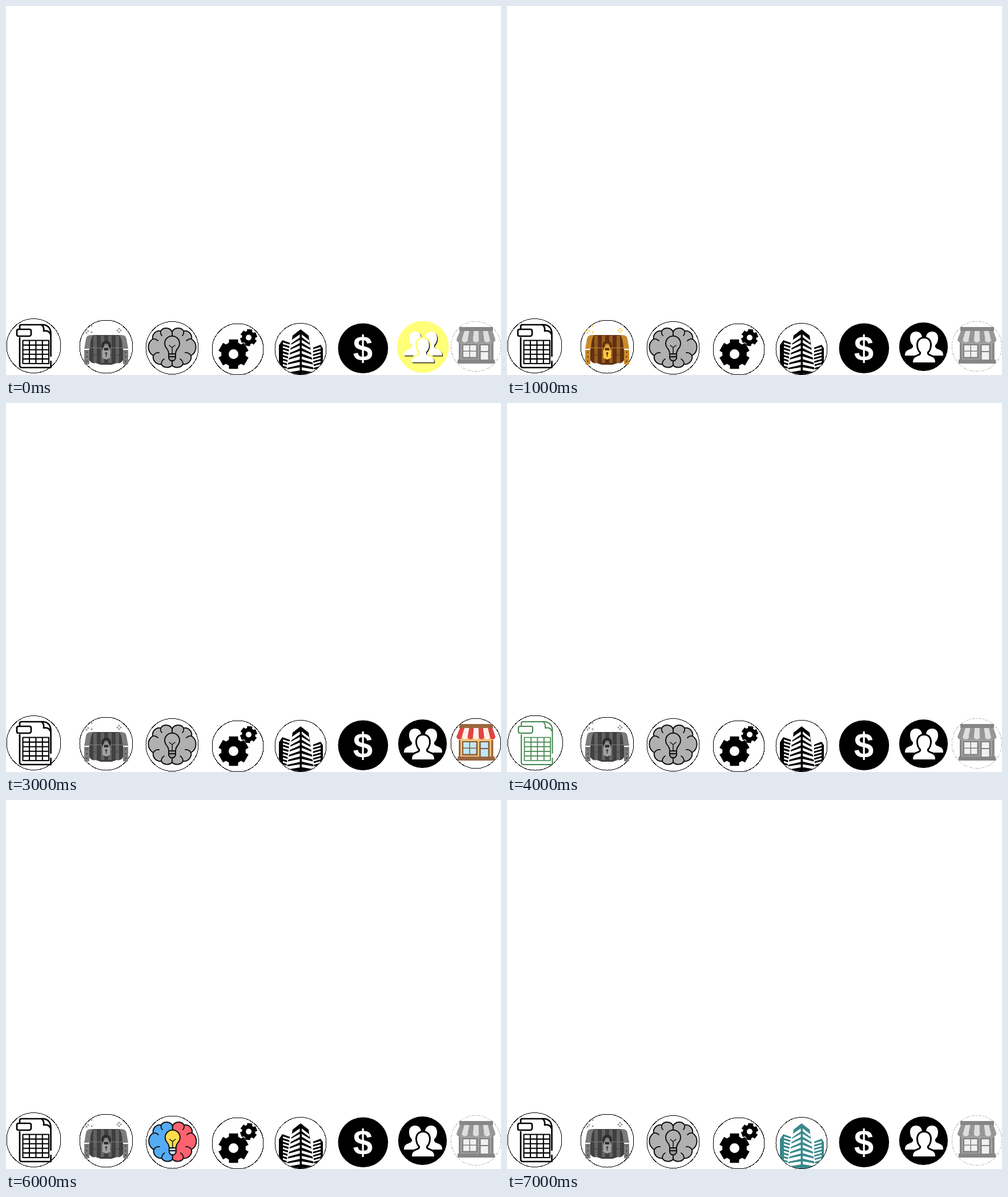
Animation, 867 px wide and 646 px high, one loop 8000 ms. Source, as an HTML page:

```html
<!DOCTYPE html>
<html lang="en">
<head>
<meta charset="utf-8">
<style>
  html, body { margin: 0; height: 100%; overflow: hidden; background: #fff; }
  svg { display: block; width: 867px; height: 646px; }
</style>
</head>
<body>
<svg id="stage" viewBox="0 0 867 646"></svg>
<script>
const STEP = 1000;
const ORDER = ['people', 'chest', 'gears', 'shop', 'sheet', 'dollar', 'brain', 'towers'];

const range = n => [...Array(n).keys()];
const repeat = (n, draw) => range(n).map(draw).join('');
const path = (d, fill = 'none', stroke = 'none', width = 1) =>
  `<path d="${d}" fill="${fill}" stroke="${stroke}" stroke-width="${width}" stroke-linecap="round" stroke-linejoin="round"/>`;
const rect = (x, y, w, h, fill) => `<rect x="${x}" y="${y}" width="${w}" height="${h}" fill="${fill}"/>`;
const disc = (x, y, r, fill, extra = '') =>
  `<circle cx="${x}" cy="${y}" r="${r}" fill="${fill}" ${extra}/>`;
const ring = (x, y, r, color = '#000', extra = '') =>
  disc(x, y, r, '#fff', `stroke="${color}" shape-rendering="crispEdges" ${extra}`);
const shift = (x, y, body) => `<g transform="translate(${x} ${y})">${body}</g>`;
const mirror = (axis, body) => `<g transform="matrix(-1 0 0 1 ${2 * axis} 0)">${body}</g>`;

function gear(cx, cy, outer, root, hole, turn) {
  const at = (r, deg) => {
    const a = (deg + turn - 90) * Math.PI / 180;
    return `${(cx + r * Math.cos(a)).toFixed(1)} ${(cy + r * Math.sin(a)).toFixed(1)}`;
  };
  const teeth = range(6).flatMap(i => [[root, -22], [outer, -17], [outer, 17], [root, 22]]
    .map(([r, a]) => at(r, i * 60 + a)));
  return `M${teeth.join('L')}Z M${cx - hole} ${cy}a${hole} ${hole} 0 1 0 ${2 * hole} 0a${hole} ${hole} 0 1 0 ${-2 * hole} 0Z`;
}

const icons = {
  sheet(on) {
    const ink = on ? '#3f8549' : '#000';
    const lines = [
      'M24 564V561Q24 558 27 558H66Q78 560 78.5 573V613 M78.5 622V633H28Q24 633 24 629V581',
      'M62 558Q67 561 66 569Q75 567 78 575',
      'M22 566H41Q44 566 44 569V574Q44 578 40 578H22Q19 578 19 575V569Q19 566 22 566Z'
    ].join('');
    const table = 'M29.5 585.5H75V626H29.5Z' +
      repeat(3, i => `M${41 + i * 11.4} 585.5V626`) +
      repeat(4, i => `M29.5 ${593.6 + i * 8.1}H75`);
    return ring(on ? 49.5 : 48.5, 595, on ? 48 : 47.5) +
      shift(on ? 1 : 0, 0, path(lines, 'none', ink, on ? 2 : 2.7) + path(table, 'none', ink, on ? 1.7 : 2.1));
  },

  chest(on) {
    const [dark, wood, metal, lock, spark] = on
      ? ['#5f3210', '#9a5a20', '#c98a2c', '#ffc83d', '#ffc83d']
      : ['#404040', '#626262', '#7c7c7c', '#a2a2a2', '#8c8c8c'];
    const side = path('M137 600L140 583Q141 576 149 576H153Q148 580 147 600Z', metal) +
      path('M137 602H146V627L140 628Q137 628 137 625Z', metal) +
      repeat(3, i => disc(141.5, 606 + i * 8, 1.3, dark));
    return ring(175.5, 596.5, 46.5) +
      path('M146 600Q147 577 153 576H198Q204 577 205 600V620Q201 627 194 625L185 628H166L157 625Q150 627 146 620Z', dark) +
      repeat(4, i => rect(153 + i * 13, 577, 6, 48, wood)) +
      path('M138 598.5H213', 'none', metal, 1.2) + path('M146 611H205', 'none', dark, 1) +
      side + mirror(175.5, side) +
      disc(175.5, 594.5, 8.5, on ? dark : '#2c2c2c') + disc(175.5, 595, 4, metal) +
      path('M170.5 604V601a5 5 0 0 1 10 0V604', 'none', lock, 2) +
      path('M168.5 603H182.5V616L175.5 619L168.5 616Z', lock) +
      disc(175.5, 608, 2, dark) + rect(174.7, 608, 1.6, 6, dark) +
      [[198, 565], [201, 568], [198, 571], [195, 568], [141, 566], [144, 569], [141, 572], [138.5, 569], [150, 571], [150, 560]]
        .map(([x, y]) => disc(x, y, 1.5, spark)).join('');
  },

  brain(on) {
    const [left, right, glass, base] = on
      ? ['#55acf5', '#ff626e', '#ffdb4d', '#c7dced']
      : ['#b0b0b0', '#b0b0b0', '#b0b0b0', '#999'];
    const half = fill =>
      path('M291 571A11 10 0 0 0 271 569A12 12 0 0 0 257 583A17 17 0 0 0 258 612A12.5 12.5 0 0 0 272 627A11 9 0 0 0 291 629Z', fill, '#111', 2) +
      path('M271 569Q270 574 273 577 M257 583Q262 582 266 586 M258 612Q262 606 268 607 M272 627Q272 621 277 618', 'none', '#111', 1.8);
    return ring(on ? 291.5 : 291, on ? 599 : 598.5, 46) +
      shift(on ? 0.8 : 0, 0,
        half(left) + mirror(291, half(right)) +
        path('M285 609Q285 604 281 599A13 13 0 1 1 301 599Q297 604 297 609Z', glass, '#111', 2) +
        path('M291 609V598L286 594 M291 598L296 594', 'none', '#111', 1.5) +
        path('M285 609H297V617L294 621H288L285 617Z', base, '#111', 2) +
        path('M285 614H297', 'none', '#111', 1.8));
  },

  gears(on) {
    const shape = gear(398.5, 609.5, 27, 21.5, 8.5, 0) + gear(425, 580.5, 15.3, 11.8, 5, 8);
    return ring(406, on ? 600.5 : 601, on ? 45.5 : 45) +
      `<path fill-rule="evenodd" fill="${on ? '#fb2020' : '#000'}" d="${shape}"/>`;
  },

  towers(on) {
    const ink = on ? '#38898c' : '#000';
    const stripes = (n, x1, y1, x2, y2, gap, h) => repeat(n, i =>
      path(`M${x1} ${y1 + i * gap}L${x2} ${y2 + i * gap}v${h}L${x1} ${y1 + i * gap + h}Z`, '#fff'));
    // Floors flatten and the faces flare toward the ground.
    const floors = repeat(7, i => {
      const y = 575 + i * 9.6, drop = 10 - i, edge = 14 + i * 1.6;
      return path(`M518 ${y}L${517 + edge} ${y + drop}v4.8L518 ${y + 4.8}Z`, '#fff') +
        path(`M514.5 ${y}L${514 - edge} ${y + drop}v5.4L514.5 ${y + 5.4}Z`, '#fff');
    });
    return ring(516, 600.5, 45) +
      `<clipPath id="round">${disc(516, 600.5, 44.5, '#000')}</clipPath><g clip-path="url(#round)">` +
      path('M478 594L484 585L498 590L496 646H478Z', ink) +
      stripes(8, 485, 589, 498, 593, 6.3, 3) +
      path('M555 599L551 593L538 598L537 646H555Z', ink) +
      stripes(7, 537, 601, 551, 597, 6, 3) +
      path('M499 576L516 564L532 576L541 646H490Z', '#fff') +
      path('M502 577L516 566L530 577L540 646H491Z', ink) + floors + '</g>';
  },

  dollar(on) {
    const sign = (x, y, fill) => `<text x="${x}" y="${y}" text-anchor="middle" fill="${fill}"
      font-family="Liberation Sans, sans-serif" font-weight="700" font-size="62">$</text>`;
    return disc(625.4, 599.3, on ? 44.7 : 43.8, on ? '#56905f' : '#000') +
      (on ? sign(626.5, 621.5, '#000') : '') + sign(625, 620, '#fff');
  },

  people(on) {
    const back = on ? '#ffff78' : '#000';
    const person = (x, y) => `M${x} ${y}c6.5 0 10.5 4.5 10.5 11c0 6 -2 10 -5 13c-1 5 3 6 8 8c4 2 6 4 6 10` +
      `H${x - 19.5}c0 -6 2 -8 6 -10c5 -2 9 -3 8 -8c-3 -3 -5 -7 -5 -13c0 -6.5 4 -11 10.5 -11Z`;
    const raised = shape => (on ? shift(1.2, 1.2, path(shape, '#000')) : '') + path(shape, '#fff');
    const front = person(730.5, 582);
    return disc(on ? 730.3 : 729.5, on ? 596.8 : 596.5, on ? 45.3 : 42.6, back) +
      raised(person(716.5, 570) + person(744.5, 570)) +
      path(front, back, back, 6) + raised(front);
  },

  shop(on) {
    const [dark, light, wall, frame, trim, glass] = on
      ? ['#e04444', '#fff0e8', '#f3c27a', '#8a5a35', '#9a6640', '#bfe8fa']
      : ['#969696', '#dedede', '#a0a0a0', '#808080', '#868686', '#f0f0f0'];
    const pane = (x, y, w, h) => rect(x, y, w, h, glass);
    return ring(823, 596, 43.8, on ? '#000' : '#b4b4b4', on ? '' : 'stroke-dasharray="5 2 2 2"') +
      rect(793, 586, 61, 36, wall) +
      rect(794, 562, 59, 7, trim) +
      repeat(7, i => {
        const top = 795 + i * 8.15, foot = 789 + i * 9.75;
        return path(`M${top} 569h8.15L${foot + 9.75} 584a4.88 5 0 0 1 -9.75 0Z`, i % 2 ? light : dark);
      }) +
      rect(799, 592, 27, 25, frame) +
      repeat(4, i => pane(801 + (i % 2) * 12, 594 + (i >> 1) * 11, 10.5, 9.5)) +
      rect(829, 592, 18, 30, frame) + pane(831.5, 594, 13, 10) + pane(831.5, 606, 13, 13) +
      rect(793, 590, 3, 32, trim) + rect(850, 590, 3, 32, trim) +
      rect(791, 619, 65, 7, trim);
  }
};

const stage = document.getElementById('stage');
let shown = -1;

function render(elapsed) {
  const step = Math.floor(elapsed / STEP) % ORDER.length;
  if (step !== shown) {
    shown = step;
    stage.innerHTML = Object.entries(icons).map(([name, draw]) => draw(name === ORDER[step])).join('');
  }
  requestAnimationFrame(() => render(performance.now() - start));
}

const start = performance.now();
render(0);
</script>
</body>
</html>
```
